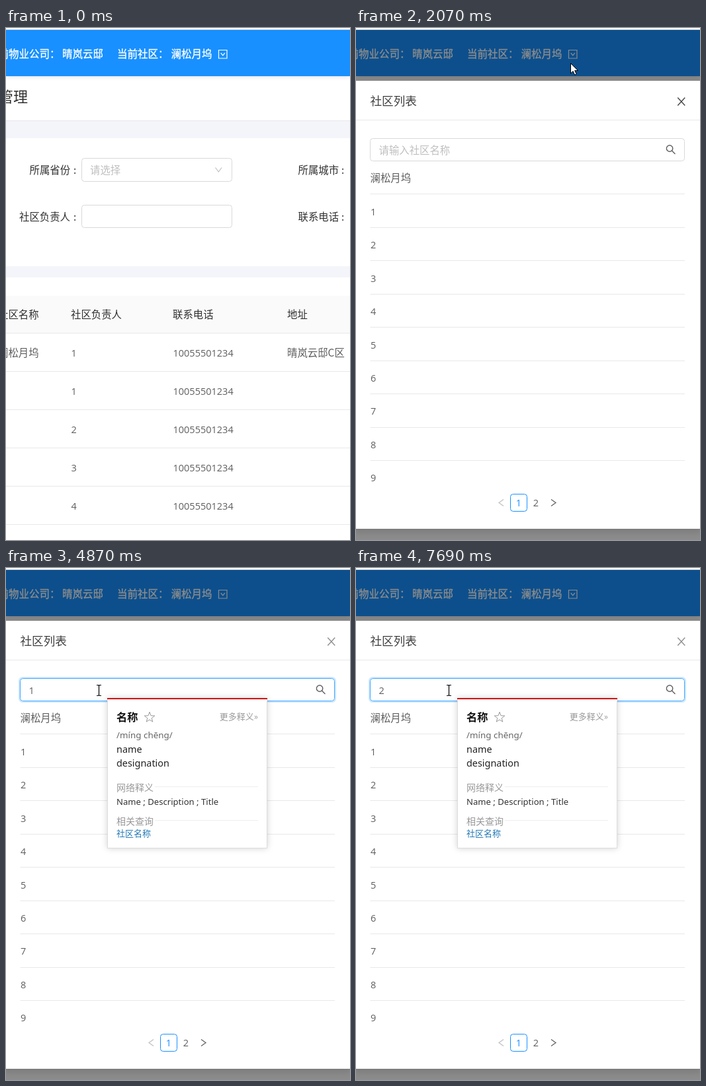
These frames come from a looping animation (520x776 px, 8000 ms). An HTML page:

```html
<!DOCTYPE html>
<html lang="zh-CN">
<head>
<meta charset="utf-8">
<title>社区管理</title>
<style>
html, body { margin: 0; width: 100%; height: 100%; overflow: hidden; background: #fff; }
svg { display: block; width: 520px; height: 776px; }
text { font-family: "Noto Sans CJK SC", "Noto Sans CJK", sans-serif; white-space: pre; }
.latin { font-family: "Open Sans", "Noto Sans", sans-serif; }
.pop .latin { font-family: "Noto Sans", sans-serif; }
.box { filter: drop-shadow(0 4px 6px rgba(0,0,0,.15)); }
.card { filter: drop-shadow(0 0 5px rgba(0,0,0,.18)); }
.bar { filter: drop-shadow(0 1px 3px rgba(0,21,41,.14)); }
</style>
</head>
<body>
<svg id="stage" viewBox="0 0 520 776" xmlns="http://www.w3.org/2000/svg"></svg>
<script>
const LOOP = 8000;
const COMPANY = '晴岚云邸', HOME = '澜松月坞', PHONE = '10055501234';
const INK = '#303030', BODY = '#5e5e5e', PALE = '#bfbfbf', LINE = '#e8e8e8', BLUE = '#1890ff';

const text = (x, y, s, fill = BODY, size = 15.4, extra = '') =>
  `<text x="${x}" y="${y}" fill="${fill}" font-size="${size}" ${extra}>${s}</text>`;
const latin = (x, y, s, fill = BODY, size = 14.5, extra = '') =>
  text(x, y, s, fill, size, `class="latin" ${extra}`);
const rect = (x, y, w, h, fill, extra = '') =>
  `<rect x="${x}" y="${y}" width="${w}" height="${h}" fill="${fill}" ${extra}/>`;
const path = (d, stroke, width = 1.2, extra = '') =>
  `<path d="${d}" fill="none" stroke="${stroke}" stroke-width="${width}" ${extra}/>`;
const field = (x, y, w, h, id = '') =>
  rect(x + .5, y + .5, w - 1, h - 1, '#fff', `rx="4" stroke="#d9d9d9" ${id}`);
const group = (id, body, extra = '') => `<g id="${id}" ${extra}>${body}</g>`;
const range = n => [...Array(n).keys()];

function pageArt() {
  const label = (x, y, s, colon) => text(x, y, s, INK) + text(colon, y, ':', INK);
  const head = (x, s) => text(x, 440, s, INK);
  const white = (x, s, id = '') =>
    text(x, 45, s, '#fff', 15.5, `font-weight="500" stroke="#fff" stroke-width=".3" ${id}`);
  const rows = ['1', '1', '2', '3', '4'].map((n, i) => {
    const y = 498 + 58 * i;
    return latin(98.5, y, n) + latin(252.5, y, PHONE) + rect(0, y + 22, 520, 1, LINE);
  }).join('');
  return rect(0, 0, 520, 776, '#fff') +
    text(-11, 112, '管理', INK, 22) +
    rect(0, 140, 520, 27, '#f4f5fa') + rect(0, 140, 520, 1, LINE) +
    rect(0, 361, 520, 17, '#f4f5fa') +
    rect(0, 3, 520, 70, BLUE, 'class="bar"') +
    white(-11.5, '前物业公司：') + white(85, COMPANY) + white(168, '当前社区：') + white(249.5, HOME, 'id="current"') +
    group('toggle', path('M321.5 33.5h12.5v12.5h-12.5zM324.8 38l3 3.6 3-3.6', '#fff')) +
    label(35.5, 221, '所属省份', 102) + field(114, 197, 228, 36) +
    text(127, 221, '请选择', PALE) + path('M316.5 211.5l4.8 6.5 4.8-6.5', PALE) +
    label(441.5, 221, '所属城市', 507) +
    label(20, 292, '社区负责人', 102) + field(114, 268, 228, 35) +
    label(441.5, 292, '联系电话', 507) +
    rect(0, 406, 520, 56, '#fafafa') + rect(0, 462, 520, 1, LINE) +
    head(-12, '社区名称') + head(98, '社区负责人') + head(252, '联系电话') + head(425, '地址') +
    text(-12, 498, HOME) + text(425, 498, COMPANY + 'C区') + rows;
}

function modalArt() {
  const rule = y => rect(21.5, Math.round(y), 475.5, 1, LINE);
  const full = text(21.5, 233, HOME) +
    range(9).map(i => rule(251 + 50.5 * i) + latin(22, 284 + 50.4 * i, i + 1)).join('') +
    rect(233.5, 706.5, 25, 26, '#fff', `rx="4" stroke="${BLUE}"`) +
    latin(246, 725, '1', BLUE, 14.5, 'text-anchor="middle"') +
    latin(272, 725, '2', BODY, 14.5, 'text-anchor="middle"') +
    path('M223 714.5l-7 5 7 5', PALE) + path('M295 714.5l7 5-7 5', BODY);
  return rect(-5, 80, 528, 679, '#fff', 'rx="4" class="box" id="panel"') +
    text(21.5, 116.5, '社区列表', '#404040', 17.6) +
    path('M486.3 105.5l11 12M497.3 105.5l-11 12', INK, 1.3, 'id="close"') +
    rect(-5, 139, 528, 1, LINE) +
    rect(20, 166, 478, 37, 'none', 'id="glow" rx="5" stroke="#1890ff" stroke-opacity=".22" stroke-width="2"') +
    field(21, 167, 476, 35, 'id="input"') +
    text(34.5, 191, '请输入社区名称', PALE, 15.4, 'id="hint"') +
    latin(34.5, 190.5, '', BODY, 14.5, 'id="query"') +
    rect(43, 174, 1, 21, '#333', 'id="caret"') +
    path('M478.8 182.5a4.7 4.7 0 1 0-9.4 0a4.7 4.7 0 1 0 9.4 0M477.5 186l5 5', BODY, 1.4) +
    group('full', full) +
    group('found', latin(22, 233, '1') + rule(251) + latin(22, 284, '10'));
}

function popupArt() {
  const star = range(10).map(i => {
    const a = i * Math.PI / 5, r = i % 2 ? 3.4 : 8.2;
    return (217 + r * Math.sin(a)).toFixed(1) + ',' + (226.5 - r * Math.cos(a)).toFixed(1);
  }).join(' ');
  return rect(153.5, 197.5, 241, 227, '#fff', 'stroke="#ddd" class="card"') +
    rect(153, 197, 242, 2, '#cc1414') +
    text(167, 232, '名称', '#111', 16.2, 'font-weight="700"') +
    `<polygon points="${star}" fill="none" stroke="#999"/>` +
    text(381, 230, '更多释义»', '#999', 13, 'text-anchor="end"') +
    latin(167, 258, '/míng chēng/', '#666', 13.4) +
    latin(167, 280, 'name', '#222', 14.4) + latin(167, 301, 'designation', '#222', 14.4) +
    text(167, 338, '网络释义', '#999', 14) + rect(225, 331, 156, 1, '#eee') +
    latin(167, 359, 'Name ; Description ; Title', '#333', 13.1) +
    text(167, 389, '相关查询', '#999', 14) + rect(225, 382, 156, 1, '#eee') +
    text(167, 407, '社区名称', '#2278b5', 13);
}

const cursors =
  group('arrow', '<path d="M.5 .5v15.3l3.6-3.4 2.5 5.7 2.6-1.2-2.5-5.4h4.8z" fill="#fff" stroke="#000"/>') +
  group('hand', '<path d="M7 14V2.2q0-1.7 1.5-1.7t1.5 1.7V8q0-1.2 1.3-1.2T12.7 8v1q0-1.2 1.2-1.2t1.3 1.2v1q0-1 1.1-1t1.2 1.4V15q0 3-2 5v3H8v-2.500Q5 18 2.500 14.500 .5 12 1.700 11.200t3 .8z" fill="#fff" stroke="#000"/><path d="M10 8v4M12.7 9v3M15.2 10v2.5" stroke="#000"/>') +
  group('beam', path('M-3 -7.5h2.500l1 1 1-1h2.500M.5 -6.500v14M-3 8.500h2.500l1-1 1 1h2.500', '#000'));

document.getElementById('stage').innerHTML =
  group('page', pageArt()) + rect(0, 3, 520, 773, '#000', 'id="mask"') +
  group('modal', modalArt()) + rect(0, 0, 520, 3, '#fff') + rect(0, 2, 520, 1, '#c8ccd0') +
  group('popup', popupArt(), 'class="pop"') + group('pointer', cursors);

const el = Object.fromEntries([...document.querySelectorAll('[id]')].map(e => [e.id, e]));
const show = (e, on) => e.setAttribute('display', on ? 'inline' : 'none');
const within = (t, a, b) => t >= a && t < b;

// Progress 0..1 in n equal jumps, the first at a and the last at b.
const jumps = (t, a, b, n) =>
  t < a ? 0 : Math.min(1, (Math.floor((t - a) / (b - a) * (n - 1) + 1e-6) + 1) / n);
const ease = p => p * p * (3 - 2 * p);
const bend = (p, a, b, c) => a.map((v, i) => (1 - p) ** 2 * v + 2 * p * (1 - p) * b[i] + p * p * c[i]);

// time, scale, opacity, mask
const ZOOM = [
  [1530, .22, .12, .01], [1600, .536, .65, .04], [1690, .88, .92, .21],
  [1770, .975, .98, .37], [1840, .996, 1, .43], [1920, 1, 1, .45]
];

function pointerAt(t) {
  if (t < 900) return ['arrow', ...bend(ease(jumps(t, 110, 900, 11)), [503, 650], [-80, 300], [337, 38])];
  if (t < 1210) return ['arrow', 337 - 2 * jumps(t, 970, 1040, 2), 37];
  if (t < 2070) return ['arrow', 335 - 7 * jumps(t, 1210, 1360, 3), 37];
  if (t < 2920) {
    const [x, y] = bend(ease(jumps(t, 2070, 2690, 9)), [328, 37], [270, 270], [112, 230]);
    return [within(y, 206, 252) ? 'hand' : 'arrow', x, y];
  }
  const p = ease(jumps(t, 2920, 3540, 9));
  const x = 112 + 28 * p, y = 230 - 45 * p;
  return [y > 203 ? 'hand' : 'beam', x, y];
}

function render(t) {
  const zoom = ZOOM.filter(k => k[0] <= t).pop();
  show(el.modal, zoom);
  show(el.mask, zoom);
  if (zoom) {
    const [, scale, opacity, dim] = zoom;
    el.modal.setAttribute('transform', `translate(656 471) scale(${scale}) translate(-656 -471)`);
    el.modal.setAttribute('opacity', opacity);
    el.mask.setAttribute('opacity', dim);
  }

  const focus = t >= 3410;
  show(el.glow, focus);
  el.input.setAttribute('stroke', focus ? '#40a9ff' : '#d9d9d9');
  el.close.setAttribute('stroke', focus ? '#8c8c8c' : '#404040');

  const query = within(t, 4320, 6340) ? '1' : t >= 6420 ? '2' : '';
  el.query.textContent = query;
  show(el.hint, !query);
  el.caret.setAttribute('x', query ? 43 : 35);
  show(el.caret, [[3410, 3940], [4320, 4870], [5420, 5970], [6340, 6980], [7130, 7690]]
    .some(([a, b]) => within(t, a, b)));

  const found = within(t, 5270, 7050);
  show(el.found, found);
  show(el.full, !found);
  el.panel.setAttribute('height', found ? 275 : 679);
  el.current.textContent = found ? '1' : HOME;
  el.toggle.setAttribute('transform', `translate(${found ? -53 : 0} 0)`);
  show(el.popup, t >= 4090);

  const [kind, x, y] = pointerAt(t);
  show(el.pointer, t >= 110);
  for (const k of ['arrow', 'hand', 'beam']) show(el[k], k === kind);
  el.pointer.setAttribute('transform', `translate(${Math.round(x)} ${Math.round(y)})`);
}

const start = performance.now();
function tick() {
  render((performance.now() - start) % LOOP);
  requestAnimationFrame(tick);
}
tick();
</script>
</body>
</html>
```
